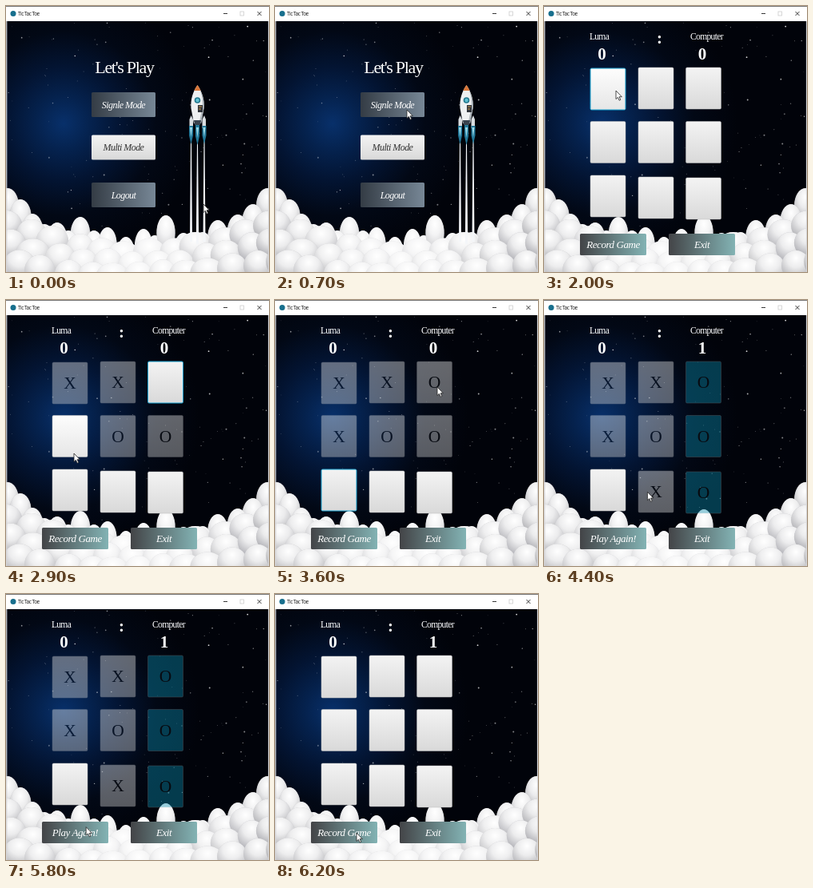
An HTML page for the animation above (6300 ms loop, 329x333 px).

```html
<!DOCTYPE html>
<html lang="en">
<head>
<meta charset="utf-8">
<title>Tic Tac Toe</title>
<style>
  html, body { margin: 0; width: 100%; height: 100%; overflow: hidden; background: #fff; }
  svg { display: block; width: 329px; height: 333px; }
  text { font-family: "Liberation Serif", "Times New Roman", serif; text-anchor: middle; fill: #fff; }
  .title { font: 6.5px "Open Sans", sans-serif; letter-spacing: -.5px; text-anchor: start; fill: #111; }
  .heading { font-size: 22px; letter-spacing: -1.3px; }
  .menu { font-size: 12px; font-style: italic; letter-spacing: -.55px; }
  .action { font-size: 13px; font-style: italic; letter-spacing: -.45px; }
  .player { font-size: 11.5px; letter-spacing: -.65px; }
  .score { font-size: 21px; font-weight: bold; }
  .mark { font-size: 21.5px; fill: #111; }
</style>
</head>
<body>
<svg id="stage" viewBox="0 0 329 333">
  <defs>
    <radialGradient id="night" gradientUnits="userSpaceOnUse" cx="72" cy="147" r="170">
      <stop offset="0" stop-color="#08306a"/>
      <stop offset=".2" stop-color="#05224e"/>
      <stop offset=".42" stop-color="#031432"/>
      <stop offset=".68" stop-color="#020815"/>
      <stop offset="1" stop-color="#01030a"/>
    </radialGradient>
    <radialGradient id="glow" cx=".5" cy=".25" r=".7">
      <stop offset="0" stop-color="#fff"/>
      <stop offset=".45" stop-color="#fff" stop-opacity=".75"/>
      <stop offset="1" stop-color="#fff" stop-opacity="0"/>
    </radialGradient>
    <linearGradient id="plain" x2="0" y2="1">
      <stop offset="0" stop-color="#f3f3f3"/>
      <stop offset="1" stop-color="#d9d9d9"/>
    </linearGradient>
    <linearGradient id="hover" x2="0" y2="1">
      <stop offset="0" stop-color="#fdfdfd"/>
      <stop offset="1" stop-color="#e6e6e6"/>
    </linearGradient>
    <linearGradient id="slate">
      <stop offset="0" stop-color="#343c45"/>
      <stop offset="1" stop-color="#778796"/>
    </linearGradient>
    <linearGradient id="teal">
      <stop offset="0" stop-color="#434447"/>
      <stop offset="1" stop-color="#83b3b4"/>
    </linearGradient>
  </defs>

  <rect width="329" height="333" fill="url(#night)"/>
  <g id="stars" fill="#fff"></g>
  <g id="clouds"></g>

  <g id="menu">
    <path d="M231 165h1l1 130h-3zM239 172h1l1.200 126h-3.400zM247.500 165h1l1 130h-3z" fill="#f4f6f9"/>
    <g id="rocket">
      <path d="M229.500 142l2-5 2.500 5v11h-4.500zM245.500 142l2.500-5 2 5v11h-4.500z" fill="#d9dde0"/>
      <path d="M229 150h5v12l-2.500 11-2.500-11zM245.500 150h5v12l-2.500 11-2.500-11zM237 149h5v14l-2.500 11-2.500-11z" fill="#24799a"/>
      <path d="M230 152h3l-1.500 12zM246.500 152h3l-1.500 12zM238 152h3l-1.500 13z" fill="#9fdcea"/>
      <path d="M239.500 99C234 107 230.500 117 231.500 128l3.500 19h9l3.500-19c1-11-2.500-21-8-29z" fill="#eef0f1"/>
      <path d="M239.500 99c-1.800 2.500-3 4.500-4 7h8c-1-2.500-2.200-4.500-4-7z" fill="#d9773a"/>
      <path d="M243 106c2.500 7 3.500 14 2.500 22l-4 19h2.500l3.500-19c1-9-1-16-4.500-22z" fill="#aeb5bb"/>
      <circle cx="239.500" cy="118" r="3.800" fill="#23788e"/>
      <circle cx="239.500" cy="118" r="2.200" fill="#62c1d2"/>
      <rect x="240" y="124" width="6" height="9" fill="#30343b"/>
      <path d="M241 126h4M241 129h3" stroke="#d39a4a"/>
      <path d="M235 143h9l-1 6h-7z" fill="#39434e"/>
    </g>
    <text class="heading" x="148" y="84">Let's Play</text>
  </g>

  <g id="game">
    <text class="player" x="69" y="42">Luma</text>
    <text class="player" x="203.500" y="42">Computer</text>
    <text class="score" x="144.500" y="46.500">:</text>
    <text class="score" x="72.500" y="67">0</text>
    <text class="score" id="rival" x="198" y="67">0</text>
  </g>

  <rect width="329" height="19" fill="#fff"/>
  <path d="M0 .5H329" stroke="#777"/>
  <path d="M.75 19V333M328.500 19V333" stroke="#d5d5d8" stroke-width="1.200"/>
  <circle cx="9" cy="9.500" r="3.500" fill="#176f8d"/>
  <text class="title" x="15" y="12">Tic Tac Toe</text>
  <path d="M272 9.500h5M314.500 7l5 5m0-5l-5 5" stroke="#222" stroke-width=".9" fill="none"/>
  <rect x="293" y="7" width="4.500" height="5" fill="none" stroke="#ccc" stroke-width=".8"/>

  <path id="cursor" d="M0 0v10.500l2.400-2.200 1.700 3.900 1.700-.8-1.700-3.700h3.200z" fill="#fff" stroke="#222" stroke-width=".8"/>
</svg>
<script>
const LOOP = 6300, STEP = 100;
const GAME_START = 900, WIN = 4200, RESET = 6000;
const byId = id => document.getElementById(id);

function add(parent, tag, attrs, content = '') {
  const node = document.createElementNS('http://www.w3.org/2000/svg', tag);
  for (const key in attrs) node.setAttribute(key, attrs[key]);
  node.textContent = content;
  parent.appendChild(node);
  return node;
}

function seeded(seed) {
  return () => (seed = seed * 16807 % 2147483647) / 2147483647;
}

const sideways = x => Math.abs(x - 164) / 164;

// A grey lobe with a white glow near its top; lobes darken towards the sides.
function puff(cx, top, rx, ry) {
  const shape = { cx, cy: top + ry, rx, ry };
  add(byId('clouds'), 'ellipse', { ...shape, fill: `hsl(240 3% ${86 - 16 * sideways(cx)}%)` });
  add(byId('clouds'), 'ellipse', { ...shape, fill: 'url(#glow)' });
}

function drawSky() {
  const rand = seeded(71);
  for (let i = 0; i < 130; i++) {
    add(byId('stars'), 'circle', {
      cx: 3 + rand() * 323, cy: 21 + rand() * 258,
      r: .35 + rand() ** 3 * .7, opacity: .3 + rand() * .6
    });
  }
  const crests = [
    [2, 228], [327, 228], [18, 242], [309, 248], [33, 260], [290, 261], [48, 273],
    [265, 268], [64, 271], [246, 283], [93, 264], [78, 281], [110, 281], [127, 277],
    [150, 289], [172, 279], [186, 287], [200, 262], [222, 284]
  ];
  crests.forEach(([x, top]) => puff(x, top, 11 + 3 * sideways(x), 22));
  for (let row = 0; row < 3; row++) {
    for (let i = 0; i < 12; i++) {
      const x = i * 30 - 4 + row * 7 + rand() * 9;
      const rise = (38 - 11 * row) * sideways(x) ** 2;
      puff(x, 289 + row * 14 - rise + rand() * 6, 17 + rand() * 5, 19);
    }
  }
}

function button(parent, x, y, w, h, fill, style, label, ink = '#fff') {
  add(parent, 'rect', { x, y, width: w, height: h, rx: 1.5, fill: `url(#${fill})` });
  return add(parent, 'text', { class: style, x: x + w / 2, y: y + h / 2 + 4, style: `fill:${ink}` }, label);
}

drawSky();
button(byId('menu'), 107, 108, 80, 31, 'slate', 'menu', 'Signle Mode');
button(byId('menu'), 107, 161.5, 80, 31, 'plain', 'menu', 'Multi Mode', '#333');
button(byId('menu'), 107, 221, 80, 31, 'slate', 'menu', 'Logout');
const record = button(byId('game'), 45, 285, 83, 27, 'teal', 'action', 'Record Game');
button(byId('game'), 156, 285, 83, 27, 'teal', 'action', 'Exit');

const cells = Array.from({ length: 9 }, (_, i) => {
  const col = i % 3, row = Math.floor(i / 3);
  const x = [58, 118, 177.5][col];
  const y = [78, 144.5, 212][row] + (row === 2 ? [0, 2, 3][col] : row === 0 && col ? -1 : 0);
  const group = add(byId('game'), 'g', {});
  const box = add(group, 'rect', { x, y, width: 44, height: 52, rx: 1.5 });
  const mark = add(group, 'text', { class: 'mark', x: x + 22, y: y + 33 });
  return { x, y, group, box, mark };
});

// time, player's cell, computer's reply
const turns = [[2100, 0, 4], [2500, 1, 5], [3200, 3, 2], [WIN, 7, 8]];
const focusChanges = [[2000, 0], [2100, 1], [2500, 2], [3200, 6], [WIN, -1]];
const winners = [2, 5, 8];

// time, x, y of the pointer's tip
const path = [
  [0, 247, 248], [700, 165, 130], [900, 165, 130], [1000, 168, 135], [1300, 166, 130],
  [1400, 166, 130], [2000, 90, 106], [2300, 140, 113], [2400, 140, 113], [2900, 85, 192],
  [3200, 82, 176], [3600, 203, 109], [4200, 140, 238], [4900, 103, 246], [5300, 91, 255],
  [5900, 102, 299], [LOOP, 102, 299]
];

function pointerAt(t) {
  const next = path.findIndex(p => p[0] > t);
  const [t0, x0, y0] = path[next - 1], [t1, x1, y1] = path[next];
  const u = (t - t0) / (t1 - t0);
  return [x0 + (x1 - x0) * u, y0 + (y1 - y0) * u];
}

function drawBoard(t, px, py) {
  const marks = {};
  if (t < RESET) {
    for (const [time, mine, reply] of turns) {
      if (t >= time) { marks[mine] = 'X'; marks[reply] = 'O'; }
    }
  }
  const focus = focusChanges.filter(f => t >= f[0]).pop()?.[1] ?? -1;
  const won = t >= WIN && t < RESET;
  cells.forEach(({ x, y, group, box, mark }, i) => {
    const over = px >= x && px <= x + 44 && py >= y && py <= y + 52;
    group.setAttribute('opacity', marks[i] ? .4 : 1);
    mark.textContent = marks[i] || '';
    box.setAttribute('fill', won && winners.includes(i) ? '#0a90b2' : over ? 'url(#hover)' : 'url(#plain)');
    box.setAttribute('stroke', i === focus ? '#159fce' : '#b9b9b9');
    box.setAttribute('stroke-width', i === focus ? 1 : .5);
  });
  byId('rival').textContent = t >= WIN ? 1 : 0;
  record.textContent = won ? 'Play Again!' : 'Record Game';
}

function render(now) {
  const t = Math.floor(now % LOOP / STEP) * STEP;
  const [px, py] = pointerAt(t);
  const playing = t >= GAME_START;
  byId('menu').style.display = playing ? 'none' : '';
  byId('game').style.display = playing ? '' : 'none';
  byId('cursor').setAttribute('transform', `translate(${px} ${py})`);
  drawBoard(t, px, py);
}

const start = performance.now();
function tick() {
  render(performance.now() - start);
  requestAnimationFrame(tick);
}
tick();
</script>
</body>
</html>
```
